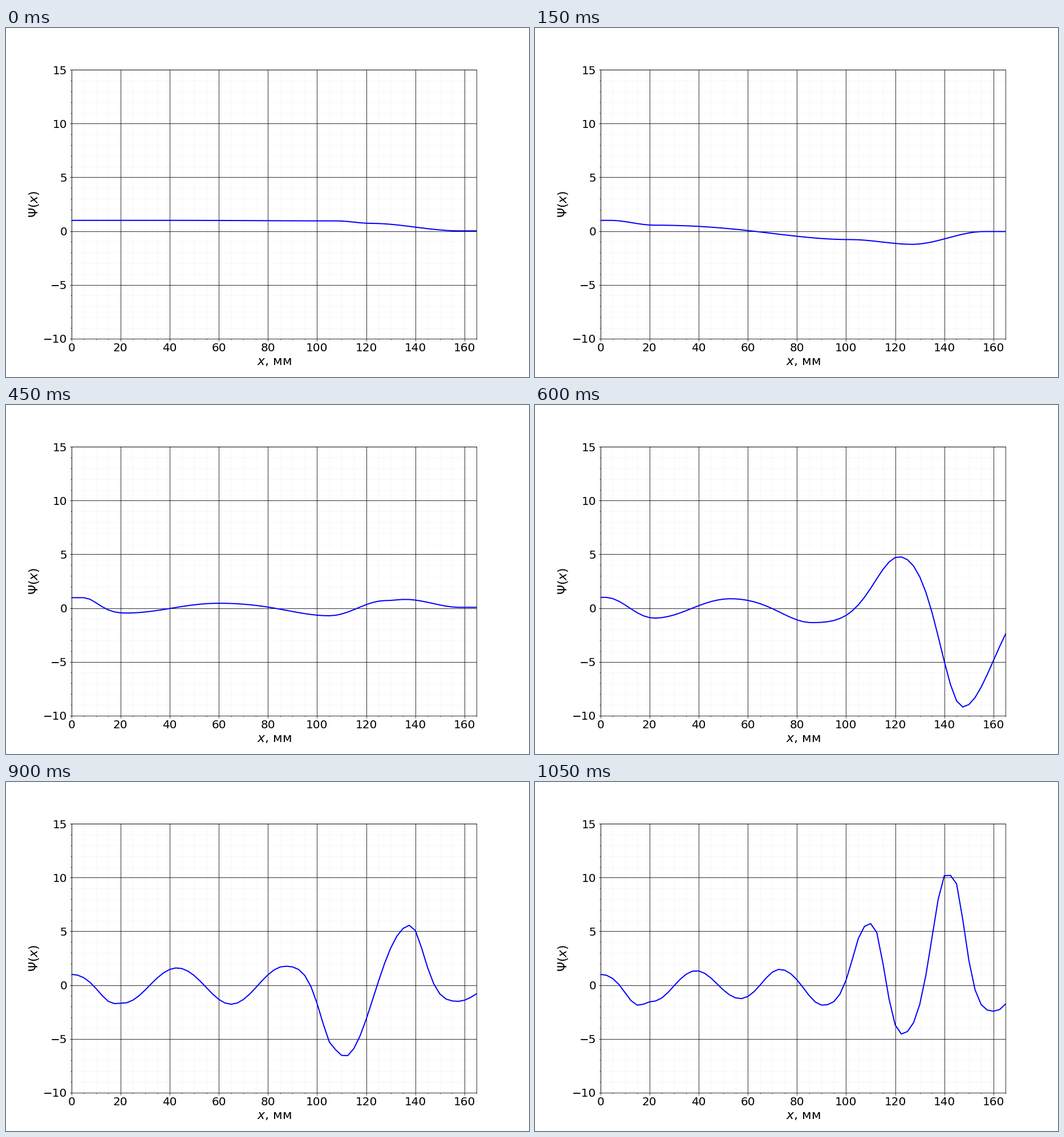
These frames come from a looping animation (917 by 611 pixels, 2050 ms). A matplotlib script:

```python
import numpy as np
import matplotlib.pyplot as plt
from matplotlib.animation import FuncAnimation

LENGTH, STEP = 165, 2.5
TICK_MS = 50
TICKS_PER_MODE = 3   # the last mode is held until the loop ends
TICKS = 41

x = np.arange(0, LENGTH + STEP / 2, STEP)


def smooth(t):
    return t * t * (3 - 2 * t)


def swing(t, a, b):
    """Ease from a to b; across zero, follow a cosine with a geometric envelope."""
    if a * b > 0:
        return a + (b - a) * smooth(t)
    return a * abs(b / a) ** smooth(t) * np.cos(np.pi * t)


def wave(*turns):
    """Standing wave through its turning points (position, height)."""
    y = np.full_like(x, turns[0][1])
    for (x0, a), (x1, b) in zip(turns, turns[1:]):
        part = (x >= x0) & (x <= x1)
        y[part] = swing((x[part] - x0) / (x1 - x0), a, b)
    y[x > turns[-1][0]] = turns[-1][1]
    return y


# A turn beyond the right edge shapes the slope that leaves the plot.
modes = [
    wave((40, 1), (108, .95), (122, .72), (158, .02)),
    wave((4, 1), (22, .55), (102, -.79), (127, -1.23), (156, -.04)),
    wave((0, 1), (50, -.17), (127, .46), (157, .03)),
    wave((5, .97), (22, -.46), (60, .45), (105, -.71), (128, .7),
         (136, .81), (158, .07)),
    wave((2, 1), (22, -.93), (53, .87), (86, -1.35), (121.5, 4.78),
         (147.5, -9.2), (195, 2.2)),
    wave((1, 1), (21.5, -1.3), (48, 1.25), (74, -1.55), (105, 3.78),
         (124.5, -5.48), (147.5, 13.63), (196, -3.3)),
    wave((0, 1), (17.5, -1.72), (21, -1.68), (43, 1.6), (65, -1.78),
         (87, 1.76), (107.5, -6), (111, -6.67), (138, 5.57),
         (157.5, -1.51), (184, .6)),
    wave((0, 1), (15.5, -1.88), (21.5, -1.5), (39, 1.34), (57, -1.26),
         (73, 1.47), (90.5, -1.87), (108, 5.5), (110.5, 5.75),
         (122.5, -4.55), (141, 10.4), (143.5, 10.1), (160.5, -2.43),
         (182, 1)),
]

fig, ax = plt.subplots(figsize=(12.737, 8.487), dpi=72)
ax.set_xlim(0, LENGTH)
ax.set_ylim(-10, 15)
ax.set_yticks(range(-10, 16, 5))
ax.tick_params(labelsize=20)
ax.minorticks_on()
ax.grid(which="major", color="black", lw=0.8)
ax.grid(which="minor", color="black", lw=0.8, ls=":", alpha=0.1)
ax.set_xlabel("$x$, мм", fontsize=22)
ax.set_ylabel(r"$\Psi(x)$", fontsize=22)
line, = ax.plot(x, modes[0], color="blue", lw=2)


def update(tick):
    line.set_ydata(modes[min(tick // TICKS_PER_MODE, len(modes) - 1)])
    return line,


anim = FuncAnimation(fig, update, frames=TICKS, interval=TICK_MS,
                     repeat=True, repeat_delay=0)
plt.show()
```
